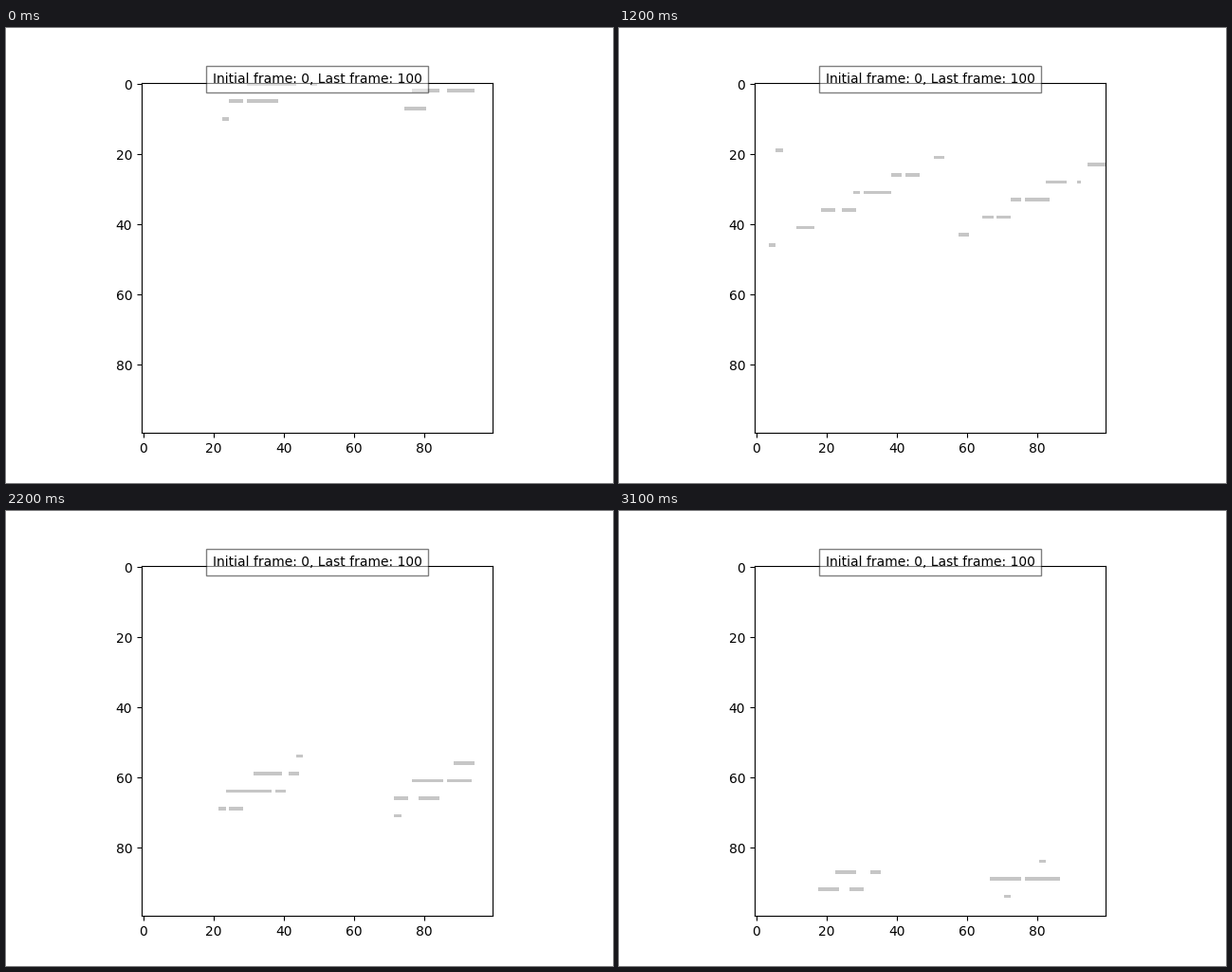
These frames come from a looping animation (640x480 px, 3.2 s). A matplotlib script:

```python
import numpy as np
import matplotlib.pyplot as plt
from matplotlib.animation import FuncAnimation
from matplotlib.transforms import ScaledTranslation

SIDE = 100      # the grid shows a flattened strip, 100 cells per row
STRIDE = 246    # cells between neighbouring scan lines of the figure
FRAMES = 32
GREY = 0xC6 / 255

# Key points of the falling figure: time, first cell, scan lines, lean in cells
KEYS = [(0, -944, 9, 0), (6, 460, 15, 2), (7, 612, 10, 4), (12, 1907, 12, -8),
        (15, 2786, 8, 0), (18, 4510, 6, 1), (20, 5150, 5, 2), (24, 5740, 11, 9),
        (25, 6040, 13, 12), (30, 8320, 6, 6), (31, 8482, 5, 6)]
times, *tracks = zip(*KEYS)


def grid(time):
    rng = np.random.default_rng(time)
    top, count, lean = (np.interp(time, times, track) for track in tracks)
    swell = 7 + 3.5 * np.cos(2 * np.pi * (time - 3) / 24)
    strip = np.ones(SIDE * SIDE)
    for k, u in enumerate(np.linspace(0, 1, round(count))):
        centre = top + STRIDE * k + lean * u
        half = 1 + swell * np.sin(np.pi * u) ** 1.5
        start, end = round(centre - half), round(centre + half)
        if end <= 0:
            continue
        strip[max(start, 0):end] = GREY
        # wide lines are broken by a small gap
        width = end - start
        if width > 6:
            gap = start + rng.integers(2, width - 3)
            strip[max(gap, 0):max(gap, 0) + rng.integers(1, 2 + width // 4)] = 1
    return strip.reshape(SIDE, SIDE)


plt.rcParams["text.kerning_factor"] = 6
fig, ax = plt.subplots(figsize=(6.4, 4.8), dpi=100)
image = ax.imshow(grid(0), cmap="gray", vmin=0, vmax=1)
nudge = ScaledTranslation(-0.2 / fig.dpi, 0, fig.dpi_scale_trans)
for label in ax.get_xticklabels() + ax.get_yticklabels():
    label.set_transform(label.get_transform() + nudge)
ax.text(0.5, 1.0, "Initial frame: 0, Last frame: 100", ha="center",
        transform=ax.transAxes,
        bbox={"facecolor": "w", "alpha": 0.5, "pad": 5})


def update(time):
    image.set_data(grid(time))
    return (image,)


anim = FuncAnimation(fig, update, frames=FRAMES, interval=100,
                     repeat=True, repeat_delay=0)
plt.show()
```
